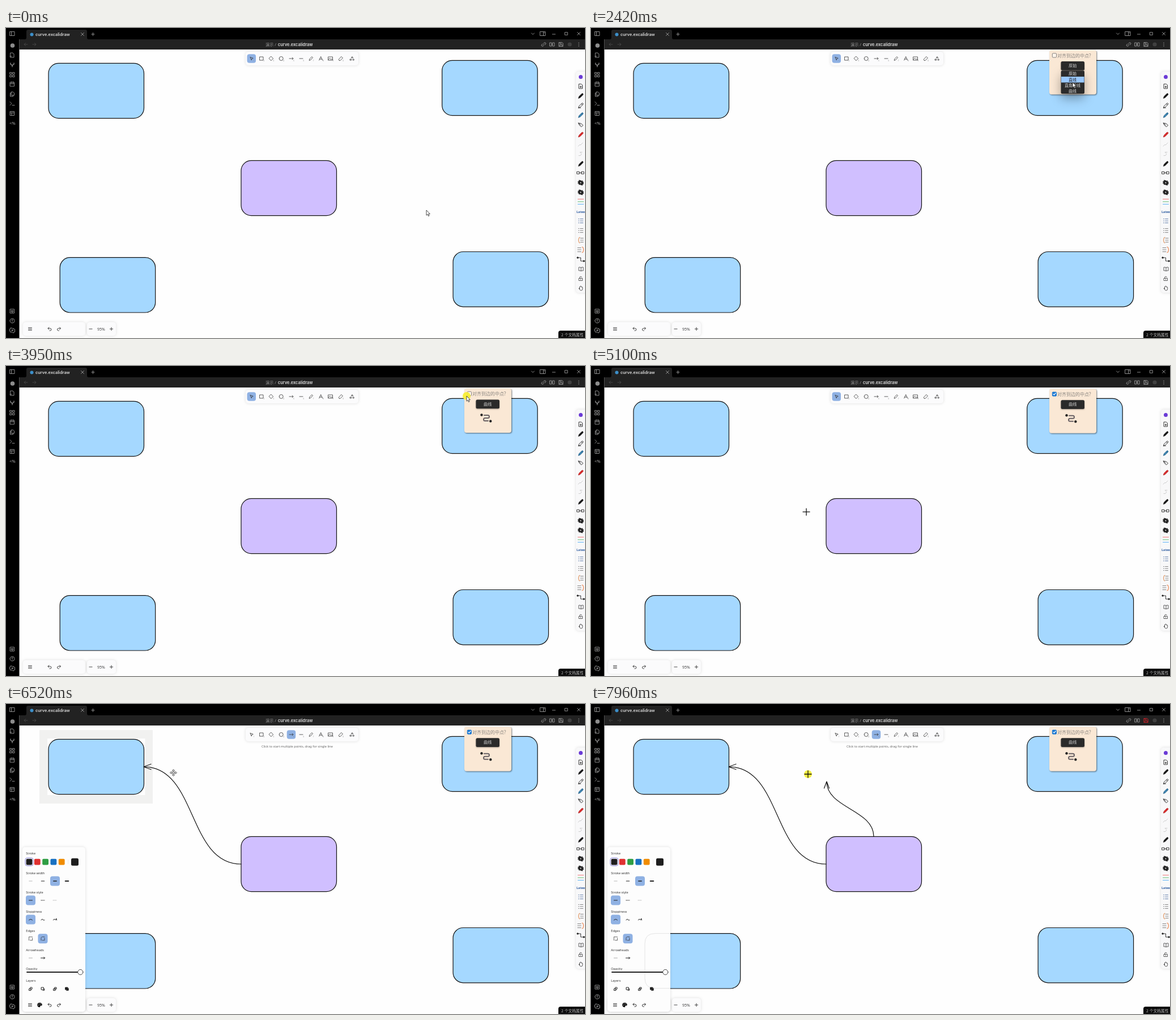
Recreate the animation shown at these times as an HTML page. Size 1022x548 px, loop 8000 ms.

```html
<!DOCTYPE html>
<html lang="zh">
<head>
<meta charset="utf-8">
<style>
html, body { margin: 0; width: 100%; height: 100%; overflow: hidden; background: #fefefe }
svg { display: block; width: 1022px; height: 548px }
text { font-family: "Noto Sans", "Open Sans", "Noto Sans CJK SC", "Noto Sans CJK", sans-serif; stroke: none }
.title { font: 600 7.4px Inter, sans-serif; fill: #dcdcdc }
.card { filter: drop-shadow(0 0 2.5px #0002) }
.line { fill: none; stroke-linecap: round; stroke-linejoin: round }
</style>
</head>
<body>
<svg id="stage" viewBox="0 0 1022 548"></svg>
<script>
const stage = document.getElementById('stage');
const rect = (x, y, w, h, fill, r = 0, more = '') =>
  `<rect x="${x}" y="${y}" width="${w}" height="${h}" fill="${fill}" rx="${r}" ${more}/>`;
const dot = (x, y, r, fill, more = '') => `<circle cx="${x}" cy="${y}" r="${r}" fill="${fill}" ${more}/>`;
const icon = (x, y, d, more = '') => `<path transform="translate(${x} ${y})" d="${d}" ${more}/>`;
const text = (x, y, size, fill, s, more = '') =>
  `<text x="${x}" y="${y}" font-size="${size}" fill="${fill}" ${more}>${s}</text>`;
const group = (id, body, more = '') => `<g id="${id}" ${more}>${body}</g>`;
const lines = (stroke, width, body) => `<g class="line" stroke="${stroke}" stroke-width="${width}">${body}</g>`;
const mid = 'text-anchor="middle"';
const active = (x, y, s = 17) => rect(x - s / 2, y - s / 2, s, s, '#8fb1e3', 4);

// Shared icon shapes, centred on 0,0
const shape = {
  box: 'M-3.5-3.5h7v7h-7z',
  pane: 'M-4-3.5h8v7h-8zM-1-3.5v7',
  page: 'M-3-4h4l2 2v6h-6z',
  cross: 'M-2.5-2.5l5 5m0-5l-5 5',
  plus: 'M-2.7 0h5.4M0-2.7v5.4',
  minus: 'M-2.6 0h5.2',
  book: 'M0-2.5Q-2-3.5-4-3v6Q-2 2.500 0 3.500 2 2.500 4 3v-6Q2-3.500 0-2.500v6',
  pen: 'M-4 4l1-3 4-4 2 2-4 4zM1-3l2-1.500 1.500 1.500-1.500 2',
  gear: 'M0-4l1 1.200 1.800-.8.400 2 1.800.6-1 1.500 1 1.500-1.800.6-.400 2-1.800-.8L0 4l-1-1.200-1.800.8-.400-2-1.800-.6 1-1.500-1-1.500 1.800-.6.400-2 1.800.8z',
  list: 'M-4-3.500h1M-4 0h1M-4 3.500h1M-1-3.500h5M-1 0h5M-1 3.500h5',
  arrow: 'M-3.500 0h7l-1.800-1.800M3.500 0l-1.800 1.800',
  save: 'M-3.500-3.500h5.500l1.500 1.500v5.500h-7zM-2 3.500v-3h4v3M-2-3.500v2h3',
  undo: 'M-1-3l-2 2 2 2M-3-1h4q2 0 2 2t-2 2h-1',
  redo: 'M1-3l2 2-2 2M3-1h-4q-2 0-2 2t2 2h1'
};

const box = (x, y, fill) => rect(x, y, 168.5, 97.3, fill, 18, 'stroke="#111" stroke-width="1.2"');

const canvas =
  group('binding', rect(59, 46, 200, 130, '#f1f1f0') + rect(73, 61, 172.5, 100, '#fefefe')) +
  [[75, 62.3], [769.7, 57.4], [95.2, 405.7], [789.1, 395.5]].map(p => box(...p, '#a5d8ff')).join('') +
  box(415, 234.3, '#d0bfff') +
  lines('#111', 1.2, '<path id="arrowA"/><path id="arrowB"/>');

const frame =
  rect(0, 0, 1022, 20, '#000') + rect(0, 0, 23.5, 548, '#000') + rect(23.5, 20, 998.5, 18, '#222') +
  '<path d="M33 20q3 0 3-3V6q0-3 3-3h101q3 0 3 3v11q0 3 3 3z" fill="#222"/>' +
  dot(45.500, 11.500, 3, '#3c8fc9') + dot(11.500, 31, 3.8, '#8c8c8c') +
  text(52, 14, 7.4, '', 'curve.excalidraw', 'class="title" style="font-size:7.3px"') +
  text(458, 31.700, 7.2, '#999', '演示 /') +
  text(480, 31.700, 7.5, '', 'curve.excalidraw', 'class="title"') +
  lines('#9a9a9a', .9,
    icon(11, 10, 'M-4-3.500h8v7h-8zM-1.500-3.500v7') + icon(135, 11, shape.cross) + icon(153.500, 11, shape.plus) +
    icon(930, 10, 'M-2.500-1l2.500 2.500 2.500-2.500') + icon(947.500, 10, 'M-4.500-3.500h9v7h-9zM1-3.500v7M2.500-1.500h1') +
    icon(967, 11, shape.minus) + icon(989, 10, 'M-2.300-2.300h4.600v4.600h-4.600z') + icon(1011, 10, shape.cross) +
    icon(949, 29, 'M-1 1l2-2M0-2l1-1q2-1 3 1 0 1-1 2l-1 1M0 2l-1 1q-2 1-3-1 0-1 1-2l1-1') +
    icon(964, 29, 'M-4-3h3v6h-3zM1-3h3v6h-3zM-1 0h2') +
    icon(979.700, 29, shape.save, 'id="save"') +
    icon(1011, 29, 'M0-2.800v.1M0 0v.1M0 2.800v.1', 'stroke-width="1.4"') +
    icon(11, 48, shape.page + 'M-4 2h3') +
    icon(11, 65, 'M-3-3h.1M3-3h.1M0 3.500V1M-3-2v1l3 2 3-2v-1', 'stroke-width="1.3"') +
    icon(11, 82.500, 'M-4-4h3v3h-3zM1-4h3v3h-3zM-4 1h3v3h-3zM1 1h3v3h-3z') +
    icon(11, 99.500, shape.box + 'M-3.500-1h7M-1.500-4.500v2M1.500-4.500v2') +
    icon(11, 117, 'M-1.500-4h3l2 2v4h-5zM-1.500-2h-2v6h5v-2') +
    icon(11, 133.500, 'M-4-3l3 3-3 3M0 3h4') + icon(11, 151, shape.box + 'M-3.500-1h7M-1-1v4.500') +
    icon(11, 500.500, shape.box + 'M-1.500-1h3v2h-3zM0 1v2') +
    icon(11, 517.500, 'M-4 0a4 4 0 1 0 8 0a4 4 0 1 0-8 0M-1-1q0-1.200 1-1.200t1 1.200l-1 1v.6M0 2v.1') +
    icon(11, 534.500, shape.gear) + dot(11, 534.500, 1.2, 'none')) +
  text(11.500, 171, 7.5, '#aaa', '&lt;%', mid) +
  dot(995, 29, 3.6, '#404040') +
  lines('#494949', .9, icon(35, 29, 'M3 0h-6l2.500-2.500M-3 0l2.500 2.500') + icon(50, 29, 'M-3 0h6L.5-2.500M3 0L.5 2.500'));

const toolX = [433.300, 451, 468, 485.700, 503.500, 521, 538.300, 555.700, 573, 591];
const toolPath = [
  'M-2-2.500l5 2-2.200.7-.7 2.300z', 'M-3-3h6v6h-6z', 'M0-3.700L3.700 0 0 3.700-3.700 0z', 'M-3.500 0a3.500 3.500 0 1 0 7 0a3.500 3.500 0 1 0-7 0',
  shape.arrow, 'M-3 0h6', 'M-3 3l.6-2.300 4-4 1.700 1.700-4 4z', 'M-3 3L0-3.500 3 3M-2 1h4',
  'M-4-3h7.500v6h-7.500zM-4 1.500l2.500-2 2 2 1.500-1 1.500 1.500', 'M-3.500 1L1-3.500l2.500 2.500-4.500 4.500h-1.500z'];
const toolbar =
  rect(423, 42, 199, 24, '#fbfbfc', 5, 'class="card"') +
  '<g id="toolMark">' + active(0, 54, 15.500) + '</g>' +
  lines('#333', .8, toolX.map((x, i) => icon(x, 54, toolPath[i])).join('') +
    icon(611, 54, 'M-1.500-1.500L0-3.500l1.500 2zM-3.500 1h2v2h-2zM1 2a1.200 1.200 0 1 0 2.400 0a1.200 1.200 0 1 0-2.400 0')) +
  toolX.map((x, i) => text(x + 3.500, 58.600, 3, '#888', (i + 1) % 10)).join('') +
  group('hint', text(514, 77.200, 5.6, '#666', 'Click to start multiple points, drag for single line', mid));

const sidebar =
  rect(1006, 77, 30, 391, '#f8f8f9', 5, 'class="card"') + dot(1014.500, 86.500, 3.5, '#6a3ad6') +
  lines('#222', .9,
    icon(1014.500, 103, shape.page + 'M-1.500 1h3M0-.5v3') +
    [120, 240].map(y => icon(1014.500, y, shape.pen, 'fill="#111"')).join('') +
    icon(1014.500, 137, shape.pen + 'M-4 4h4') + icon(1014.500, 154, shape.pen, 'stroke="#1f5d85" fill="#4088b5"') +
    icon(1014.500, 171, 'M-4-3l5 1 3 3-3 3-3-3zM-4-3l4 4') + icon(1014.500, 188.500, shape.pen, 'stroke="#b32222" fill="#e03131"') +
    icon(1014, 206, 'M-4 3l3-3 1 1 4-4', 'stroke="#c9c9c9"') + icon(1014, 222.500, 'M3-3h-4l3 3-2 3h-3', 'stroke="#c9c9c9"') +
    icon(1014, 256, 'M-6-2h4v4h-4zM2-2h4v4h-4zM-2 0h4') +
    [273.500, 290.500].map(y => icon(1014.500, y, shape.gear, 'fill="#222"') + dot(1014.500, y, 1.4, '#f8f8f8')).join('') +
    icon(1014.500, 302.500, 'M-5 0h10', 'stroke="#f06a6a"') + icon(1014.500, 307, 'M-5 0h10', 'stroke="#4fb86a"') +
    icon(1014.500, 311.500, 'M-5 0h10', 'stroke="#4dabf7"') +
    icon(1014.500, 341, shape.list, 'stroke="#5574a5"') + icon(1014.500, 358, shape.list, 'stroke="#777"') +
    icon(1015, 375, 'M-1-3.500h5M-1 0h5M-1 3.500h5', 'stroke="#777"') + icon(1012, 375, 'M1-5q-2 0-2 2.500t-1 2.500q1 0 1 2.500t2 2.500', 'stroke="#d9732c"') +
    icon(1013, 392, 'M-4-3.500h6M-4 0h6M-4 3.500h6', 'stroke="#777"') + icon(1018, 392, 'M-1-5q2 0 2 2.500t1 2.500q-1 0-1 2.500t-2 2.500', 'stroke="#e8590c"') +
    icon(1014.500, 409, 'M-5-3h5v6h5') + dot(1009, 406, 1.2, '#222') + dot(1020, 412, 1.2, '#222') +
    icon(1015, 426, shape.book, 'stroke-width=".7"') + icon(1014.500, 443, 'M-3-.5h6v4h-6zM-1.700-.5v-1.500q0-1.700 1.700-1.700 1.500 0 1.700 1.300M0 1v1', 'stroke-width=".7"') +
    icon(1014.500, 460, 'M-2 1v-3.500q.7-.9 1.300 0v-1q.7-.8 1.300 0v1q.8-.8 1.400 0v1q.7-.7 1.200 0V1q0 3-2.500 3-2 0-3.200-2.500l-1-1.500q.7-.8 1.500 1z', 'stroke-width=".7"')) +
  text(1014.500, 326.500, 5.4, '#23549c', 'Latex', mid + ' font-weight="600"');

const footer =
  rect(30, 520, 110, 24, '#fbfbfc', 5, 'class="card"') + rect(143, 520, 51, 24, '#fbfbfc', 5, 'class="card"') +
  text(168, 534.700, 7, '#444', '95%', mid) +
  lines('#333', .9, icon(42.500, 532, 'M-3-2.300h6M-3 0h6M-3 2.300h6') + icon(77, 532, shape.undo) + icon(93.500, 532, shape.redo) +
    icon(149.500, 532, shape.minus) + icon(186, 532, shape.plus)) +
  '<path d="M975 548v-9q0-4 4-4h43v13z" fill="#0b0b0b"/>' + text(980, 544.500, 6.8, '#bbb', '2 个文档属性');

const labels = { Stroke: 265.700, 'Stroke width': 301, 'Stroke style': 334.500, Sloppiness: 368.500, Edges: 402.500, Arrowheads: 436.500, Opacity: 470, Layers: 490.500 };
const col = [43.500, 65, 86.500, 107.500];
const row = (y, list) => list.map((d, i) => icon(col[i], y, ...[].concat(d))).join('');
const wave = 'M-3 1q1.500-3 3-1t3 1';
const panel =
  rect(29, 253, 111, 291, '#fdfdfd', 5, 'class="card"') +
  '<path id="ghost" d="M140 405.700H113q-18 0-18 18v61q0 18 18 18h27" fill="none" stroke="#e4e4e4"/>' +
  Object.entries(labels).map(([s, y]) => text(35.300, y, 5.6, '#333', s)).join('') +
  rect(34, 272, 14, 14, 'none', 3.5, 'stroke="#7a75d8" stroke-width=".9"') +
  ['#1e1e1e', '#e03131', '#2f9e44', '#1971c2', '#f08c00'].map((c, i) => rect(35.600 + i * 14.300, 273.700, 10.800, 10.800, c, 2)).join('') +
  rect(115, 272.700, 13, 13, '#1e1e1e', 2.5) + rect(109.500, 275, .6, 8, '#ddd') +
  active(86.500, 313) + active(43.500, 347) + active(43.500, 381) + active(65, 414.700) +
  lines('#222', 1,
    row(313, [['M-2.700 0h5.400', 'stroke="#888" stroke-width=".6"'], ['M-2.700 0h5.400', 'stroke-width="1.1"'], ['M-2.700 0h5.400', 'stroke-width="1.5"'], ['M-2.700 0h5.400', 'stroke-width="2.2"']]) +
    row(347, ['M-3 0h6', ['M-3 0h6', 'stroke-dasharray="1.2 1.6"'], ['M-3.500 0h7', 'stroke="#999" stroke-width=".7" stroke-dasharray=".3 1.1"']]) +
    row(381, ['M-3 1q3-3 6 0', wave, 'M-3 1q1-3 3-1t2-1 1 2']) +
    row(414.700, [['M-3 3v-6h6M3-1v4h-4', 'stroke-width=".7" stroke-dasharray="1.500 .8"'], ['M-3 3v-4q0-2 2-2h4M3-1v4h-4', 'stroke-width=".7" stroke-dasharray="1.500 .8"']]) +
    row(449, [['M-3 0h6', 'stroke="#888" stroke-width=".7"'], shape.arrow]) +
    row(503.500, ['M-2.500 0h3v3h-3zM-.5-2.500h3v3h-3z', 'M-2.500-2.500h4v4h-4zM2.700 0v2.700H0', 'M-2.500 0h3v3h-3zM-.5-2.500h3v3h-3zM-1 1l2-2', ['M-2.500-2.500h4v4h-4zM2.700-1v3.700H-1', 'fill="#222"']]) +
    '<path d="M37 474H127" stroke-width="1.8"/>' + dot(131.300, 474, 4.6, '#fff', 'stroke="#333" stroke-width=".9"') +
    icon(42.500, 532, 'M-3-2.300h6M-3 0h6M-3 2.300h6', 'stroke-width=".9"') + icon(77, 532, shape.undo, 'stroke-width=".9"') + icon(93.500, 532, shape.redo, 'stroke-width=".9"')) +
  '<path d="M59.500 528a4.200 4 0 1 0 0 8q1.300 0 .8-1.400t1-1.400h1.500q1.300-.3 1-1.900-.8-3.300-4.300-3.300z" fill="#111"/>' +
  dot(57.500, 532.500, .6, '#fff') + dot(58.500, 530, .6, '#fff') + dot(61.300, 530.200, .6, '#fff');

const rowY = [80.300, 90.700, 101, 111.200];
const popup =
  rect(809, 38.500, 83, 78.500, '#fae8d5', 4, 'style="filter:drop-shadow(1px 1px 1px #0008)"') +
  rect(814.300, 44.300, 7.2, 7.2, '#fff6ec', 1.2, 'id="check" stroke="#666" stroke-width=".8"') +
  '<path id="tick" class="line" d="M816 48l1.400 1.500 2.700-3.200" stroke="#fff" stroke-width="1.2"/>' +
  text(823, 51, 8, '#8b8680', '对齐到边的中点?') +
  rect(829.500, 58.500, 41.500, 15.700, '#2a2a2a', 2.5, 'style="filter:drop-shadow(0 1px 1px #0005)"') +
  text(850.300, 68.800, 7.2, '#d0d0d0', '原始', mid + ' id="choice"') +
  group('straight', lines('#4a4a4a', 1.8, '<path d="M841 84l13 13"/>') + dot(841, 84, 2.2, '#333') + dot(854.300, 97, 2.2, '#333')) +
  group('curved', lines('#6a6265', 2, '<path d="M844 86h6.500a2.500 2.500 0 0 1 0 5h-5a2.500 2.500 0 0 0 0 5h5.500"/>') + dot(839.500, 85.500, 2.2, '#222') + dot(855.300, 96.500, 2.2, '#222')) +
  group('menu',
    rect(829.500, 74.800, 41.500, 41, '#2b2b2b', 2.5, 'style="filter:drop-shadow(0 8px 9px #0005)"') +
    rect(830, 0, 40.500, 10.400, '#99c8ff', 0, 'id="hover"') +
    ['原始', '直线', '直角折线', '曲线'].map((s, i) => text(850, rowY[i] + 2.500, 7, '#ddd', s, mid + ' class="item"')).join(''));

const pointer =
  dot(0, 0, 7, '#f7ee2f', 'id="press" fill-opacity=".9"') +
  '<path id="tip" d="M0 0v9.200l2.100-1.900 1.500 3.300 1.500-.7-1.500-3.200h2.800z" fill="#fff" stroke="#222" stroke-width=".8"/>' +
  '<path id="plus" d="M-6.500 0h13M0-6.500v13" stroke="#111" stroke-width="1.3"/>' +
  '<path id="move" d="M0-6l2 2.200H.8v3h3V-2L6 0 3.800 2V.8h-3v3H2L0 6l-2-2.200h1.200v-3h-3V2L-6 0l2.200-2v1.200h3v-3H-2z" fill="#fff" stroke="#333" stroke-width=".8"/>';

stage.innerHTML = canvas + sidebar + toolbar + footer + group('panel', panel) + group('popup', popup) + frame + group('pointer', pointer);

const el = {};
stage.querySelectorAll('[id]').forEach(e => el[e.id] = e);
const items = [...stage.querySelectorAll('.item')];
const show = (id, on) => el[id].style.display = on ? '' : 'none';
const set = (id, name, value) => el[id].setAttribute(name, value);

// Screen updates arrive in bursts: start, end, steps
const bursts = [[140, 530, 5], [710, 1110, 5], [1290, 1760, 6], [1950, 2600, 8], [2910, 3000, 2], [3190, 3950, 9], [4080, 4550, 6],
  [4730, 4820, 2], [5000, 5580, 7], [5870, 6330, 6], [6520, 7080, 7], [7270, 7470, 3], [7650, 7960, 4]];
function snap(t) {
  const b = bursts.filter(b => t >= b[0]).pop();
  if (!b) return 0;
  const [start, end, n] = b, step = (end - start) / (n - 1);
  return Math.min(end, start + Math.floor((t - start) / step + .01) * step);
}

// Pointer path: time, x, y
const path = [[45, 742, 322], [430, 1004, 420], [530, 1010, 410], [740, 1010, 410], [1110, 657, 176], [1200, 657, 176], [1478, 811, 62],
  [1760, 822, 56], [1860, 822, 56], [2050, 850, 66], [2230, 850, 66], [2414, 850, 96], [2600, 850, 98], [3000, 850, 107], [3300, 850, 107],
  [3860, 813, 53], [4080, 813, 53], [4550, 523, 184], [4640, 523, 184], [4820, 437, 202], [5097, 380, 258], [5290, 408, 280],
  [5770, 408, 280], [6330, 250, 113], [6520, 295.500, 121.500], [7080, 498, 233], [7270, 498, 233], [7470, 505, 230], [7550, 505, 230], [7960, 383, 124]];
const part = (t, a, b) => Math.max(0, Math.min(1, (t - a) / (b - a)));
function pointerAt(t) {
  const i = path.findIndex(p => p[0] >= t);
  if (i < 1) return path[i ? path.length - 1 : 0].slice(1);
  const [a, b] = [path[i - 1], path[i]], k = part(t, a[0], b[0]);
  return [1, 2].map(j => a[j] + (b[j] - a[j]) * k);
}

function arrowA(k) {
  const x = 415 - 172 * k, y = 283 - 172 * k, d = 95 * k, s = Math.min(1, k * 2.5);
  return `M415 283C${415 - d} 283 ${x + d} ${y} ${x} ${y}m${13 * s} ${-4.8 * s}L${x} ${y}l${13 * s} ${4.8 * s}`;
}
function arrowB(k) {
  const x = 499 - 83 * k, y = 234 - 97 * k, d = 47 * k, s = Math.min(1, k * 2);
  return `M499 234C499 ${234 - d} ${x} ${y + d} ${x} ${y}m${-4.500 * s} ${12 * s}L${x} ${y}l${4.500 * s} ${12 * s}`;
}

const presses = [[710, 800], [2040, 2140], [3190, 3280], [3940, 4080], [5380, 6400], [7650, 8000]];
function draw() {
  const t = snap(performance.now() % 8000);
  const within = (a, b) => t >= a && t < b;
  const tool = t >= 5190, moving = within(6520, 6700), checked = t >= 4080, curved = t >= 3280;

  set('pointer', 'transform', `translate(${pointerAt(t)})`);
  show('press', presses.some(p => within(...p)));
  show('tip', t < 5000);
  show('plus', t >= 5000 && !moving);
  show('move', moving);

  show('popup', t >= 890);
  set('popup', 'transform', `translate(0 ${t < 1950 ? 0 : t < 3190 ? .5 : checked ? 1.700 : 1})`);
  set('check', 'fill', checked ? '#1877d2' : '#fff6ec');
  set('check', 'stroke', checked ? '#1877d2' : '#666');
  show('tick', checked);
  el.choice.textContent = curved ? '曲线' : '原始';
  show('straight', !curved);
  show('curved', curved);
  show('menu', within(2140, 3280));
  const hover = t < 2300 ? 0 : t < 2500 ? 1 : t < 3000 ? 2 : 3;
  set('hover', 'y', rowY[hover] - 5.200);
  items.forEach((e, i) => e.setAttribute('fill', i === hover ? '#222' : '#ddd'));

  set('toolMark', 'transform', `translate(${toolX[tool ? 4 : 0]} 0)`);
  show('hint', tool);
  show('panel', tool);
  show('ghost', t >= 7080);
  show('binding', moving);
  set('save', 'stroke', t >= 7080 ? '#d3222a' : '#9a9a9a');
  set('arrowA', 'd', t < 5870 ? '' : arrowA(part(t, 5780, 6330)));
  set('arrowB', 'd', t < 7650 ? '' : arrowB(part(t, 7560, 7960)));
  requestAnimationFrame(draw);
}
draw();
</script>
</body>
</html>
```
